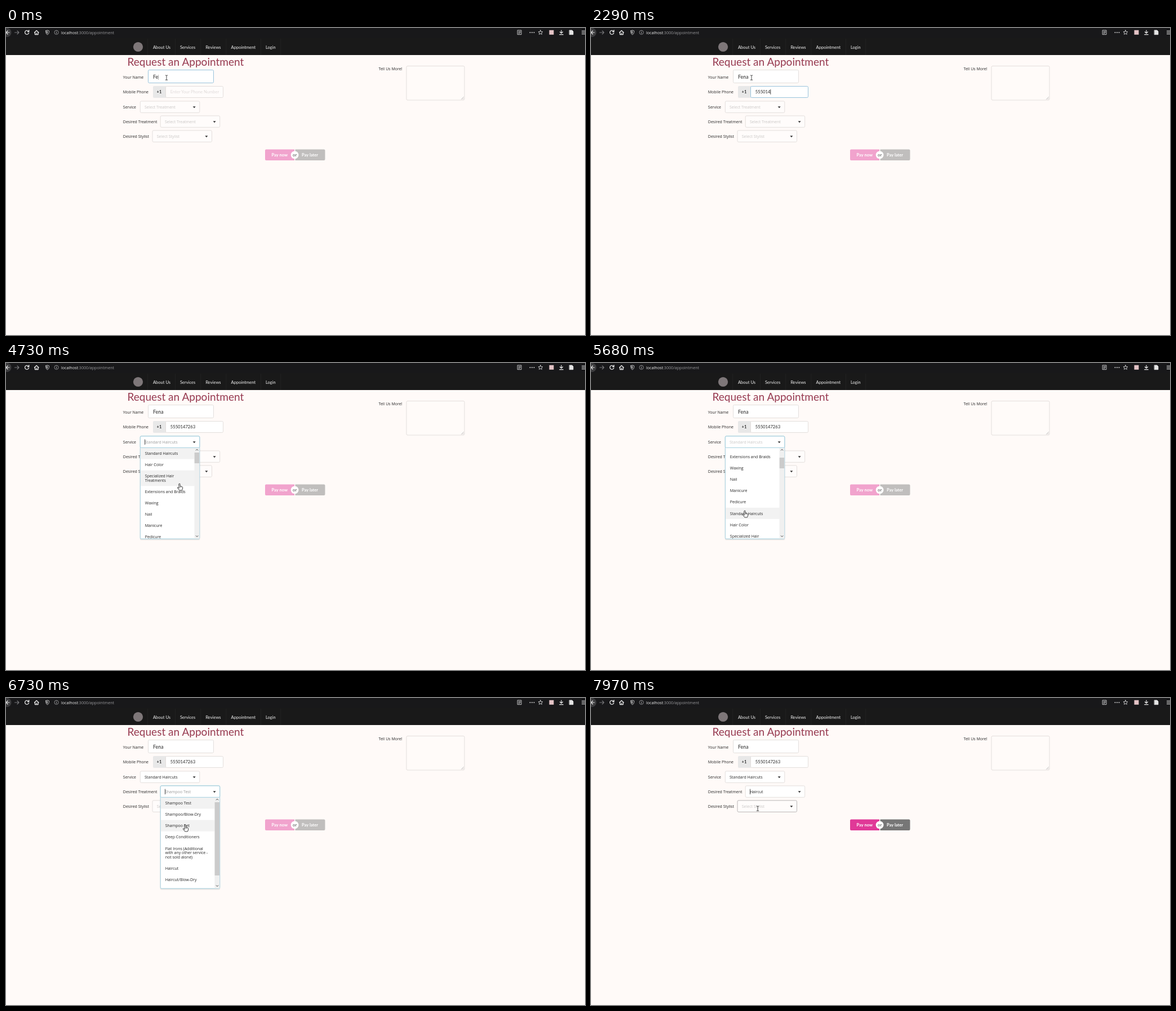
These frames come from a looping animation (1028 by 545 pixels, 8 s). An HTML page:

```html
<!DOCTYPE html>
<html lang="en">
<head>
<meta charset="utf-8">
<title>Request an Appointment</title>
<style>
html, body { margin: 0; width: 100%; height: 100%; overflow: hidden; background: #fffaf8; }
svg { display: block; width: 100vw; height: 100vh; }
text { font: 7px "Open Sans", "Noto Sans", sans-serif; white-space: pre; }
text.l { font-family: Lato, sans-serif; font-size: 7.55px; }
text.b { font-weight: 700; }
</style>
</head>
<body>
<svg viewBox="0 0 1028 545" preserveAspectRatio="none">
  <g id="base"></g>
  <g id="live"></g>
</svg>
<script>
const LOOP = 8000;
const NAME = 'Fena', PHONE = '5550147263';
const INK = '#262626', PALE = '#c8c6c5', MID = '#9b9b9b';
const LINE = '#e0dcda', HOVER = '#b0aeae', FOCUS = '#8dbdd8', OPEN = '#96c8da';
const ROW = 20.1, LEAD = 7.6, VIEW = 162;
const $ = id => document.getElementById(id);

const rect = (x, y, w, h, fill, extra = '') =>
  `<rect x="${x}" y="${y}" width="${w}" height="${h}" fill="${fill}" ${extra}/>`;
const text = (x, y, s, fill = INK, cls = '', extra = '') =>
  `<text x="${x}" y="${y}" fill="${fill}" class="${cls}" ${extra}>${s}</text>`;
const path = (d, stroke, w = 1, fill = 'none') =>
  `<path d="${d}" fill="${fill}" stroke="${stroke}" stroke-width="${w}" stroke-linecap="round" stroke-linejoin="round"/>`;
const circle = (x, y, r, fill, extra = '') =>
  `<circle cx="${x}" cy="${y}" r="${r}" fill="${fill}" ${extra}/>`;
const box = (x, y, w, h, stroke, fill = '#fff') =>
  rect(x + .5, y + .5, w - 1, h - 1, fill, `rx="2" stroke="${stroke}" stroke-width=".9"`);
const caret = (x, y, h = 9) => rect(x, y - h / 2, .8, h, '#222');

// Latest value whose start time has passed
const at = (steps, t) => steps.reduce((v, s) => t >= s[0] ? s[1] : v, steps[0][1]);

const services = ['Standard Haircuts', 'Hair Color', 'Specialized Hair|Treatments',
  'Extensions and Braids', 'Waxing', 'Nail', 'Manicure', 'Pedicure'];
const serviceList = [...services, ...services.slice(0, 3)];
const treatmentList = ['Shampoo Test', 'Shampoo/Blow-Dry', 'Shampoo Set', 'Deep Conditioners',
  'Flat Irons (Additional|with any other service -|not sold alone)', 'Haircut',
  'Haircut/Blow-Dry', 'Kids Haircut'];

const typedName = [[0, 2], [120, 3], [300, 4]];
const typedPhone = [[0, 0], [1320, 1], [1470, 2], [1620, 3], [1890, 4], [2170, 5],
  [2290, 6], [2600, 7], [2880, 8], [3030, 9], [3340, 10]];
const phoneCaret = [[0, 0], [670, 1], [1200, 0], [1320, 1], [3490, 0]];
const serviceScroll = [[0, 0], [4970, 8], [5100, 32], [5250, 54], [5400, 62]];
const treatmentScroll = [[0, 0], [6880, 7], [7000, 17]];
// [time, [x, y, kind]]
const mouse = [
  [0, [285, 88, 'beam']], [3920, [287, 100, 'beam']], [4050, [294, 126, 'beam']],
  [4180, [298, 141, 'beam']], [4440, [301, 160, 'hand']], [4580, [305, 189, 'hand']],
  [4730, [308, 214, 'hand']], [4850, [307, 224, 'hand']], [4970, [299, 238, 'hand']],
  [5100, [288, 250, 'hand']], [5250, [278, 259, 'hand']], [5400, [273, 262, 'hand']],
  [5930, [281, 232, 'arrow']], [6070, [300, 188, 'beam']], [6200, [310, 168, 'beam']],
  [6490, [314, 190, 'hand']], [6610, [317, 212, 'hand']], [6730, [318, 225, 'hand']],
  [6880, [314, 252, 'hand']], [7000, [309, 275, 'hand']], [7120, [306, 284, 'hand']],
  [7670, [304, 260, 'arrow']], [7820, [299, 218, 'arrow']], [7970, [296, 196, 'beam']]
];

function base() {
  const grey = '#d4d4d5';
  let s = rect(0, 0, 1028, 545, '#fffaf8') + rect(0, 0, 1028, 18, '#18181a') + rect(0, 18, 1028, 30, '#191919');

  s += circle(1.5, 8, 8, '#3c3c3e') + path('M6 8H0M3 5L0 8L3 11', '#e8e8e8', 1.2);
  s += path('M15.5 8H23M20 5L23 8L20 11', '#77777a', 1.1);
  s += path('M39.8 5.6A3.5 3.5 0 1 0 40.5 8.6M40.8 3.8V6.6H38', '#f0f0f0', 1.3);
  s += path('M50.5 8L54.2 4.5L58 8M51.5 8V11.6H57V8M54.2 11V9', '#f0f0f0', 1.3);
  s += path('M70.5 5L73.5 4L76.5 5C76.5 8.5 75.8 10.6 73.5 11.8C71.2 10.6 70.5 8.5 70.5 5Z', grey, .9);
  s += path('M73.5 5.7V10C72.4 9 72 7.8 72 6.2Z', grey, .4, grey);
  s += circle(89.5, 7.8, 3.6, 'none', 'stroke="#a8a8aa" stroke-width=".8"') + path('M89.5 7.4V9.6M89.5 5.8V5.9', '#a8a8aa', .9);
  s += text(98, 10.6, '<tspan fill="#f0f0f0">localhost</tspan>:3000/appointment', '#98989b', '', 'style="font-size:7.15px"');

  s += path('M908.5 4H915V11.6H908.5ZM910 6.2H913.5M910 8H913.5M910 9.7H912', grey, .9);
  s += [930.5, 934, 937.5].map(x => circle(x, 8, 1, grey)).join('');
  let star = '';
  for (let i = 0; i < 10; i++) {
    const r = i % 2 ? 1.9 : 4.1, a = i * Math.PI / 5;
    star += `${i ? 'L' : 'M'}${949 + r * Math.sin(a)} ${8 - r * Math.cos(a)}`;
  }
  s += path(star + 'Z', grey, .9);
  s += rect(964.5, 3.8, 8, 8, '#e3c3c6');
  s += path('M986 4V9M983.5 7L986 9.4L988.5 7M982.8 11.7H989.2', '#f0f0f0', 1.2);
  s += path('M1000.5 4H1005L1007 6V11.7H1000.5Z', '#ececec', .8, '#e4e4e4');
  s += path('M1022.5 5.3H1030M1022.5 8H1030M1022.5 10.7H1030', '#e8e8e8', 1);

  s += circle(234.5, 33.5, 8.6, '#7e7779');
  for (const x of [252, 300.5, 346, 391, 452.5, 488]) s += rect(x - .5, 19, .7, 29, '#262626');
  for (const [x, label] of [[261, 'About Us'], [309, 'Services'], [354.4, 'Reviews'], [399.6, 'Appointment'], [461, 'Login']])
    s += text(x, 36.6, label, '#f4f4f4', 'l');

  s += text(215.5, 66.6, 'Request an Appointment', '#973a50', 'l', 'style="font-size:19.05px"');
  for (const [y, label] of [[89.6, 'Your Name'], [116, 'Mobile Phone'], [142.6, 'Service'], [168.8, 'Desired Treatment'], [194.8, 'Desired Stylist']])
    s += text(207.8, y, label);
  s += text(661.5, 75, 'Tell Us More!');
  s += box(710.5, 67, 104, 61.5, LINE, '#fffbf9');
  s += path('M808.5 126.5L812.5 122.5M811 126.5L812.5 125', '#a5a3a2', .7);
  return s;
}

function select(x, y, value, color, border, fill) {
  return box(x, y, 106.5, 21.4, border, fill) + text(x + 8.2, y + 13.4, value, color) +
    `<path d="M${x + 93.9} ${y + 9.9}h5l-2.5 2.9z" fill="#333"/>`;
}

// Open list below a select, with its scrollbar
function menu(x, y, items, scroll, thumb, ratio, tipY, active) {
  const id = 'clip' + x;
  let rows = '', top = y - scroll;
  items.forEach((item, i) => {
    const lines = item.split('|'), h = ROW + (lines.length - 1) * LEAD;
    const hot = tipY >= Math.max(top, y) && tipY < top + h;
    if (hot || i === active) rows += rect(x + 1, top, 96, h, '#f2f2f2');
    lines.forEach((line, k) => { rows += text(x + 9, top + 12.7 + k * LEAD, line); });
    top += h;
  });
  const bar = x + 96.7;
  return `<rect x="${x}" y="${y + 1}" width="106.5" height="${VIEW + 1}" rx="2" fill="#22242618"/>` +
    box(x, y - 21, 106.5, VIEW + 21.3, OPEN) +
    `<clipPath id="${id}"><rect x="${x + 1}" y="${y}" width="104.7" height="${VIEW - .7}"/></clipPath>` +
    `<g clip-path="url(#${id})">${rows}` +
    rect(bar, y, 9.2, VIEW, '#f0f0f0') + rect(bar + .2, y + 8.6 + scroll * ratio, 8.6, thumb, '#cbcbcb') +
    path(`M${bar + 2.8} ${y + 4.6}l1.8 -1.8l1.8 1.8M${bar + 2.8} ${y + 156.3}l1.8 1.8l1.8 -1.8`, '#444', 1) + '</g>';
}

function pointer([x, y, kind]) {
  if (kind === 'beam')
    return path(`M${x - 1.8} ${y - 4}H${x - .5}L${x} ${y - 3.5}L${x + .5} ${y - 4}H${x + 1.8}M${x} ${y - 3.5}V${y + 3.8}M${x - 1.8} ${y + 4.2}H${x + 1.8}`, '#222', .8);
  if (kind === 'arrow')
    return path(`M${x} ${y}v10l2.3 -2.1l1.6 3.6l1.5 -.7l-1.6 -3.5h3.1z`, '#111', .7, '#fff');
  return path(`M${x - 1} ${y + .6}q1 -1.2 2 0v4l1.7 .3l1.7 .5l1.2 .9v2.8l-1.2 2.9h-4.6l-3.2 -4.1q-.6 -1.4 .7 -1.2l1.7 1.4z`, '#111', .8, '#fff') +
    path(`M${x + 1.2} ${y + 5}v1.8M${x + 2.9} ${y + 5.5}v1.6`, '#222', .5);
}

function buttons(on) {
  return `<g opacity="${on}">` +
    `<path d="M462 215.5H512V235H462Q460 235 460 233V217.5Q460 215.5 462 215.5Z" fill="#e03997"/>` +
    `<path d="M513.5 215.5H564.5Q566.5 215.5 566.5 217.5V233Q566.5 235 564.5 235H513.5Z" fill="#767676"/></g>` +
    text(471.5, 228, 'Pay now', '#fff', 'l b') + text(525, 228, 'Pay later', '#fff', 'l b') +
    circle(512.6, 225.4, 6.9, '#fff') +
    text(512.7, 227.9, 'or', '#777', 'l b', 'text-anchor="middle"');
}

function live(t) {
  const m = at(mouse, t), tipY = m[2] === 'hand' ? m[1] : -1;
  const named = at(typedName, t), digits = at(typedPhone, t);
  const onName = t < 550, onPhone = t >= 550 && t < 4310;
  const tint = '#fffcfb';

  let s = box(252, 74, 117, 24, onName ? FOCUS : LINE);
  s += text(261, 89.9, NAME.slice(0, named) + (onName ? '<tspan fill="#222" font-weight="300" dx="-.4">|</tspan>' : ''), INK, 'l', 'style="font-size:8.8px"');

  s += rect(261, 103, 24, 21, '#e8e8e8', 'rx="2"') + text(267.5, 116.1, '+1', '#333', 'l b');
  s += box(283, 103, 103, 21, onPhone ? FOCUS : LINE, digits ? '#fff' : tint);
  s += digits
    ? text(291.8, 116.4, PHONE.slice(0, digits), INK, 'l', 'style="font-size:7.65px"')
    : text(291.8, 116.2, 'Enter Your Phone Number', onPhone ? '#cfcccb' : '#dfdbda', 'l');
  if (at(phoneCaret, t)) s += caret(291.8 + digits * 4.44, 113.5);

  const open1 = t >= 4310 && t < 5800, open2 = t >= 6340 && t < 7670;
  const done1 = t >= 5800, done2 = t >= 7670;

  s += select(259.5, 181.4, 'Select Stylist', PALE, t >= 7970 ? HOVER : LINE, tint);
  if (!open2)
    s += select(273.7, 155.4, done2 ? 'Haircut' : 'Select Treatment', done2 ? INK : PALE,
      t >= 6200 && t < 6340 ? HOVER : LINE, done2 ? '#fff' : tint);
  if (done2) s += caret(282.2, 166.3, 9.5);
  s += buttons(t >= 7670 ? 1 : .45);
  if (!open1)
    s += select(237.8, 129.4, done1 ? 'Standard Haircuts' : 'Select Treatment', done1 ? INK : PALE,
      t >= 4050 && t < 4310 ? HOVER : LINE, done1 ? '#fff' : tint);

  if (open1) {
    const held = t >= 5680;
    s += menu(237.8, 150.4, serviceList, at(serviceScroll, t), 19, .145, tipY, 0);
    s += select(237.8, 129.4, 'Standard Haircuts', held ? PALE : MID, OPEN);
    if (!held) s += caret(246.3, 140.3, 9.5);
  }
  if (open2) {
    const held = t >= 7550;
    s += menu(273.7, 176.4, treatmentList, at(treatmentScroll, t), 130, .82, tipY, 0);
    s += select(273.7, 155.4, 'Shampoo Test', held ? PALE : MID, OPEN);
    if (!held) s += caret(282.2, 166.3, 9.5);
  }
  return s + pointer(m);
}

$('base').innerHTML = base();
let last = '';
const start = performance.now();
function tick() {
  const s = live((performance.now() - start) % LOOP);
  if (s !== last) $('live').innerHTML = last = s;
  requestAnimationFrame(tick);
}
tick();
</script>
</body>
</html>
```
